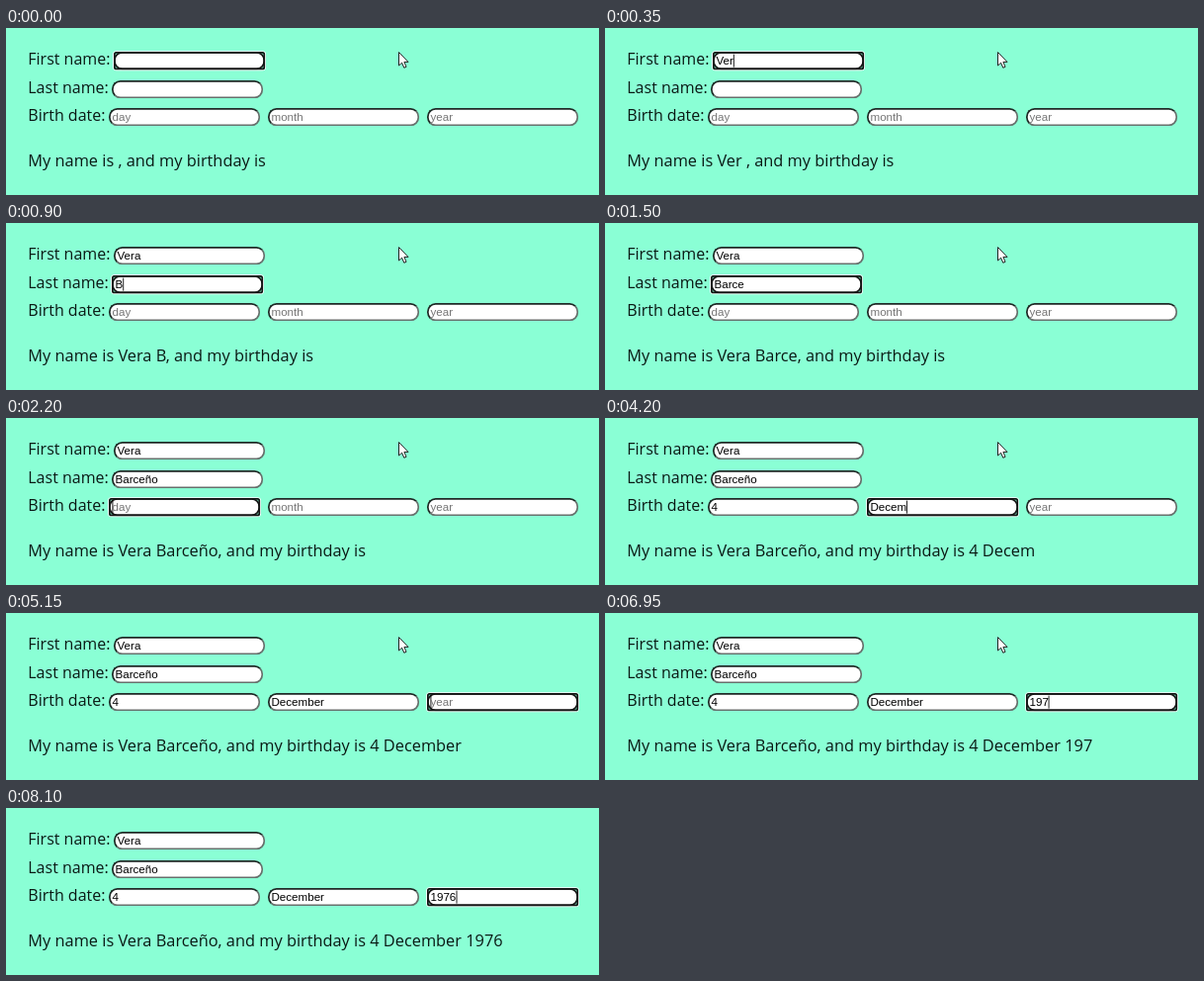
Animation of 600 by 169 pixels, one loop 8200 ms. Source, as an HTML page:

```html
<!DOCTYPE html>
<html lang="en">
<head>
<meta charset="utf-8">
<title>Birthday form</title>
<style>
  html, body { margin: 0; width: 100%; height: 100%; overflow: hidden; background: #8affd5; }
  #stage { position: relative; width: 600px; height: 169px; overflow: hidden; }
  .line {
    position: absolute; left: 22.3px; white-space: nowrap; color: #0a1914;
    font: 16px/20px "Open Sans", "Noto Sans", sans-serif;
  }
  #sentence { font-size: 16.35px; }
  .field {
    position: absolute; box-sizing: border-box; width: 176px; height: 21px;
    transform: scale(.87); transform-origin: 0 0;
    display: flex; align-items: center; padding-left: 2px; white-space: pre;
    background: #fff; color: #000; border: 2px solid; border-radius: 10px;
    border-color: #1d2925 #66706c #66706c #1d2925;
    font: 13.33px/15px "Liberation Sans", Arial, sans-serif;
  }
  .field.focus { border-color: #1a1a1a; }
  .field.focus::after {
    content: ""; position: absolute; inset: -2px; border: 2px solid #141414;
    border-radius: 3px; box-shadow: 0 0 0 1px #fff;
  }
  .caret { width: 1px; height: 15px; margin-right: -1px; background: #000; visibility: hidden; }
  .hint { color: #757575; }
  #pointer { position: absolute; left: 396px; top: 23px; }
</style>
</head>
<body>
<div id="stage">
  <div class="line" style="top:21px">First name:</div>
  <div class="line" style="top:50px">Last name:</div>
  <div class="line" style="top:78px">Birth date:</div>
  <div class="line" style="top:124px" id="sentence"></div>
  <svg id="pointer" width="14" height="20" viewBox="0 0 14 20">
    <path d="M1.5 1.5V15L4.6 12.2L6.8 17.3L9 16.3L6.9 11.4H11Z" fill="#fff" stroke="#222" stroke-width="1" stroke-linejoin="round"/>
  </svg>
</div>
<script>
const LOOP = 8200, BLINK = 255, POINTER_HIDDEN = 7550;
const TAB = "\t", BACK = "\b";

const stage = document.getElementById("stage");
const sentence = document.getElementById("sentence");
const pointer = document.getElementById("pointer");

// Key presses: time in ms, key
const keys = [
  [-255, ""],
  [100, "V"], [200, "e"], [330, "r"], [450, "a"], [600, TAB],
  [850, "B"], [950, "a"], [1050, "r"], [1150, "c"], [1240, "e"],
  [1650, "ñ"], [1850, "o"], [2150, TAB],
  [2400, "4"], [2895, TAB],
  [3145, "d"], [3690, BACK], [3790, "D"], [3890, "e"], [3990, "c"],
  [4090, "e"], [4190, "m"], [4260, "b"], [4300, "e"], [4490, "r"], [5145, TAB],
  [5690, "1"], [5990, "9"], [6400, "7"], [7045, "6"]
];

function addSpan(parent, className, text = "") {
  const span = document.createElement("span");
  span.className = className;
  span.textContent = text;
  return parent.appendChild(span);
}

function makeField(x, y, hint = "") {
  const box = document.createElement("div");
  box.className = "field";
  box.style.left = x + "px";
  box.style.top = y + "px";
  stage.appendChild(box);
  return {
    box, hint,
    value: addSpan(box, "value"),
    caret: addSpan(box, "caret"),
    placeholder: addSpan(box, "hint", hint)
  };
}

const fields = [
  makeField(109, 24.2), makeField(107, 52.7),
  makeField(104, 81.2, "day"), makeField(265, 81.2, "month"), makeField(426, 81.2, "year")
];

function stateAt(time) {
  const values = fields.map(() => "");
  let focus = 0, lastKey = 0;
  for (const [at, key] of keys) {
    if (at > time) break;
    lastKey = at;
    if (key === TAB) focus++;
    else if (key === BACK) values[focus] = values[focus].slice(0, -1);
    else values[focus] += key;
  }
  const caretOn = Math.floor((time - lastKey) / BLINK) % 2 === 0;
  return { values, focus, caretOn };
}

function render(time) {
  const { values, focus, caretOn } = stateAt(time);
  fields.forEach((field, i) => {
    field.box.classList.toggle("focus", i === focus);
    field.value.textContent = values[i];
    field.placeholder.textContent = values[i] ? "" : field.hint;
    field.caret.style.visibility = i === focus && caretOn ? "visible" : "hidden";
  });
  const [first, last, day, month, year] = values;
  sentence.textContent = `My name is ${first} ${last}, and my birthday is ${day} ${month} ${year}`;
  pointer.style.visibility = time < POINTER_HIDDEN ? "visible" : "hidden";
}

const start = performance.now();
function frame() {
  render((performance.now() - start) % LOOP);
  requestAnimationFrame(frame);
}
frame();
</script>
</body>
</html>
```
